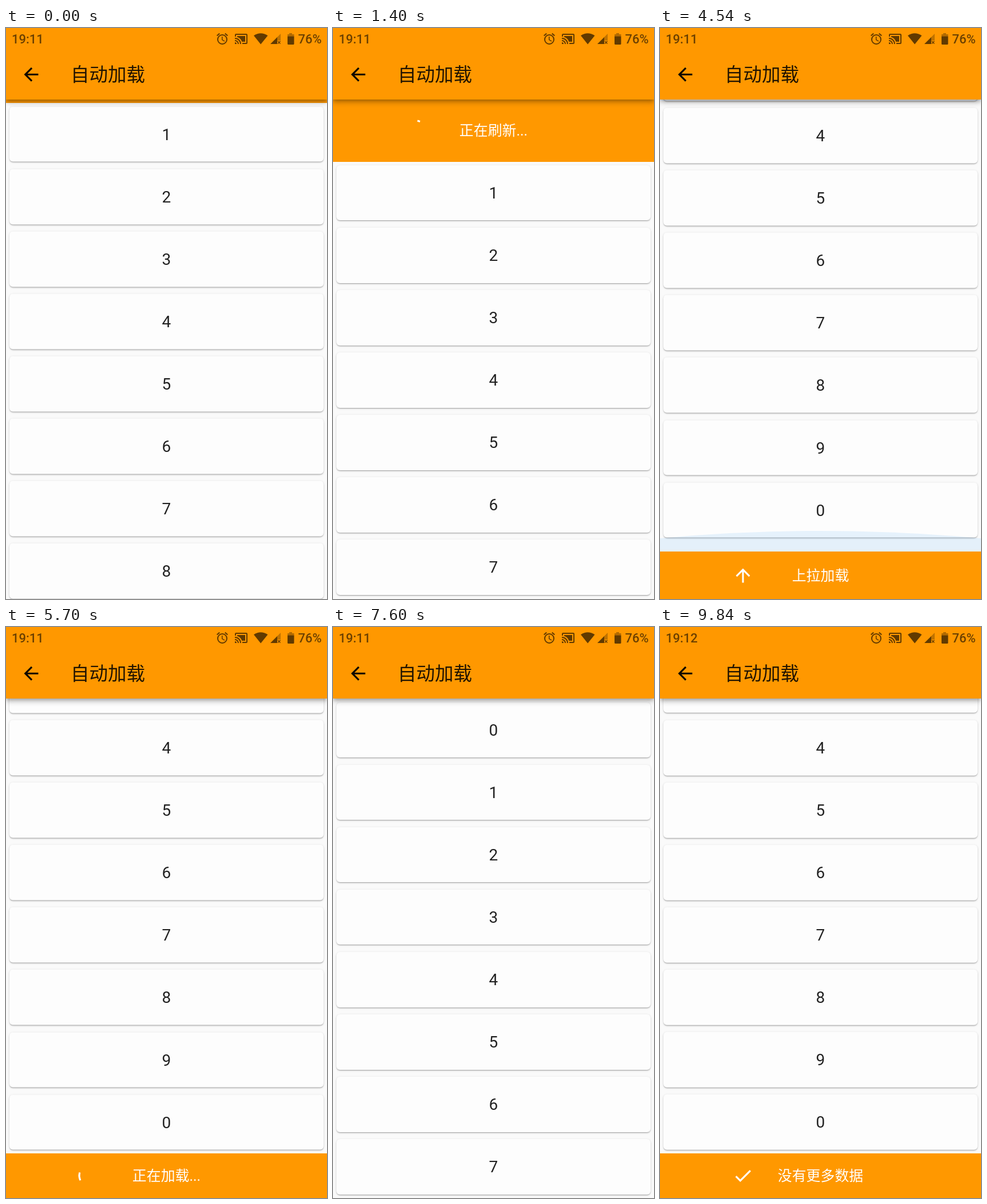
An HTML page that plays this animation: 561 by 998 pixels, repeating every 9.99 s.

```html
<!DOCTYPE html>
<html lang="zh-CN">
<head>
<meta charset="utf-8">
<title>自动加载</title>
<style>
  html, body { margin: 0; width: 100%; height: 100%; overflow: hidden; }
  body {
    position: relative; background: #fafafa; color: rgba(0, 0, 0, .87);
    font-family: Roboto, "Noto Sans CJK SC", "Noto Sans CJK", "Noto Sans", sans-serif;
  }
  #stage { position: absolute; left: 0; top: 0; width: 561px; height: 998px; overflow: hidden; }
  #list { position: absolute; left: 0; top: 124.7px; width: 561px; overflow: hidden; }
  .card {
    position: absolute; left: 6.2px; width: 548.6px; height: 96.6px; border-radius: 6px;
    background: #fdfdfd; text-align: center; font-size: 28px; line-height: 97px;
    box-shadow: 0 2px 2px -1px rgba(0, 0, 0, .2), 0 1px 2px rgba(0, 0, 0, .15), 0 1px 4px rgba(0, 0, 0, .1);
  }
  .over { position: absolute; left: 0; top: 0; width: 561px; height: 998px; }
  .bar { position: absolute; left: 0; width: 561px; overflow: hidden; background: #ff9800; color: #fff; }
  #header { top: 124.7px; }
  #footer { bottom: 0; }
  .inner { position: absolute; left: 0; width: 100%; }
  #header .inner { bottom: 0; }
  #footer .inner { top: 0; }
  .label {
    position: absolute; left: 0; right: 0; top: 50%; margin-top: -19px;
    text-align: center; font-size: 24.9px; line-height: 40px; white-space: pre;
  }
  .icon { position: absolute; left: 125px; top: 50%; width: 40px; height: 40px; margin-top: -20px; }
  #appbar {
    position: absolute; left: 0; top: 0; width: 561px; height: 124.7px; background: #ff9800;
    box-shadow: 0 3px 6px -1px rgba(0, 0, 0, .22), 0 6px 8px rgba(0, 0, 0, .14), 0 1px 14px rgba(0, 0, 0, .12);
  }
  .status {
    position: absolute; top: 5px; font-size: 22px; line-height: 30px; font-weight: 500;
    color: rgba(0, 0, 0, .58); white-space: pre;
  }
  #title { position: absolute; left: 113px; top: 62px; font-size: 32.5px; line-height: 40px; white-space: pre; }
</style>
</head>
<body>
<div id="stage">
  <div id="list"></div>
  <svg class="over"><path id="glow" fill="#2196f3" fill-opacity=".1"/></svg>
  <div id="header" class="bar"></div>
  <div id="footer" class="bar"></div>
  <div id="appbar">
    <div id="clock" class="status" style="left:10px">19:11</div>
    <div class="status" style="left:510.5px">76%</div>
    <svg class="over" style="height:124px" fill-opacity=".62">
      <path transform="translate(366 7)" d="M22 5.72l-4.6-3.86-1.29 1.53 4.6 3.86zM7.88 3.39L6.6 1.86 2 5.71l1.29 1.53zM12.5 8H11v6l4.75 2.85.75-1.23-4-2.37zM12 4a9 9 0 1 0 0 18a9 9 0 1 0 0-18zm0 16a7 7 0 1 1 0-14a7 7 0 1 1 0 14z"/>
      <path transform="translate(399 7)" d="M1 18v3h3a3 3 0 0 0-3-3zm0-4v2a5 5 0 0 1 5 5h2a7 7 0 0 0-7-7zm18-7H5v1.63A13 13 0 0 1 13.37 17H19zM1 10v2a9 9 0 0 1 9 9h2a11 11 0 0 0-11-11zm20-7H3a2 2 0 0 0-2 2v3h2V5h18v14h-7v2h7a2 2 0 0 0 2-2V5a2 2 0 0 0-2-2z"/>
      <path d="M433 13.3Q445 5 457.5 13.3L445.2 28.5z"/>
      <path d="M480 10V22H474V16z" fill-opacity=".25"/>
      <path d="M474 16V28H462z"/>
      <path d="M475 23l4.5 4.5m0-4.5l-4.5 4.5" stroke="#000" stroke-opacity=".6" stroke-width="1.4"/>
      <path d="M492 14.5V11H495V9H500V11H503.500V14.500z" fill-opacity=".3"/>
      <path d="M492 14.500H503.500V27.500Q503.500 29 502 29H493.500Q492 29 492 27.500z"/>
      <path transform="translate(25.300 62.500) scale(1.558)" fill-opacity=".95" d="M20 11H7.830l5.590-5.590L12 4l-8 8 8 8 1.410-1.410L7.830 13H20z"/>
    </svg>
    <div id="title">自动加载</div>
  </div>
</div>
<script>
const LOOP = 9990, ROW = 109.08, VIEW = 873.3, HEAD = 109.08, FOOT = 77.9, TURN = 1018;
const $ = id => document.getElementById(id);
const clamp = (v, a, b) => Math.min(b, Math.max(a, v));
const smooth = u => u * u * (3 - 2 * u);

// Smooth interpolation through [time, value] pairs.
function track(points, t) {
  let i = points.findIndex(p => p[0] > t);
  if (i === 0) return points[0][1];
  if (i < 0) return points[points.length - 1][1];
  const [t0, a] = points[i - 1], [t1, b] = points[i];
  return a + (b - a) * smooth((t - t0) / (t1 - t0));
}

// Last [time, ...values] entry already reached.
const phase = (steps, t) => steps.filter(s => s[0] <= t).pop();

// cubic-bezier(.4, 0, .2, 1)
function fastOutSlowIn(x) {
  x = clamp(x, 0, 1);
  let lo = 0, hi = 1, s = .5;
  for (let i = 0; i < 18; i++) {
    s = (lo + hi) / 2;
    const bx = 1.2 * s * (1 - s) ** 2 + .6 * s * s * (1 - s) + s ** 3;
    if (bx < x) lo = s; else hi = s;
  }
  return s * s * (3 - 2 * s);
}

const PULL = [[0, 6.5], [20, 6.5], [110, 0], [320, 0], [900, 150], [1040, 150], [1290, HEAD], [3485, HEAD], [3720, 0]];
const SCROLL = [[3730, 0], [4480, 323], [4540, 318.5], [4640, 295.4], [7112, 295.4], [7960, 1412], [8050, 1407.8], [8150, 1386.2]];
const GLOW = [[4400, 70], [4540, 119], [4850, 60], [7950, 60], [8050, 92], [8150, 108], [8450, 60]];
const FLIP = [[705, 180], [800, 0]];
const HEAD_STEPS = [
  [0, 'check', '刷新结束'], [200, 'arrow', '下拉刷新'], [705, 'arrow', '释放刷新'],
  [1355, 'spin', '正在刷新...'], [2870, 'check', '刷新结束']
];
const FOOT_STEPS = [
  [0, 'arrow', '上拉加载'], [4580, 'spin', '正在加载...'],
  [7112, 'arrow', '上拉加载'], [8080, 'spin', '正在加载...'], [9510, 'check', '没有更多数据']
];

function makeBar(el, extent) {
  el.innerHTML = `<div class="inner"><svg class="icon" viewBox="-20 -20 40 40" overflow="visible">
    <g class="arrow"><path transform="scale(1.558) translate(-12 -12)" fill="#fff" d="M4 12l1.410 1.410L11 7.830V20h2V7.830l5.580 5.590L20 12l-8-8z"/></g>
    <path class="check" transform="scale(1.558) translate(-12 -12)" fill="#fff" d="M9 16.200L4.800 12l-1.400 1.400L9 19 21 7l-1.400-1.400z"/>
    <circle class="spin" r="17" pathLength="360" fill="none" stroke="#fff" stroke-width="3.100" stroke-linecap="square"/>
    </svg><div class="label"></div></div>`;
  const find = s => el.querySelector(s);
  const inner = find('.inner'), label = find('.label');
  const icons = { arrow: find('.arrow'), check: find('.check'), spin: find('.spin') };
  return (size, [start, icon, text], t, angle) => {
    el.style.height = size + 'px';
    inner.style.height = Math.max(extent, size) + 'px';
    if (label.textContent !== text) label.textContent = text;
    for (const k in icons) icons[k].style.display = k === icon ? '' : 'none';
    icons.arrow.setAttribute('transform', `rotate(${angle})`);
    if (icon === 'spin') spin(icons.spin, (t - start) / TURN);
  };
}

function spin(circle, turns) {
  const step = Math.floor(turns), u = turns - step;
  const head = 270 * fastOutSlowIn(u * 2), tail = 270 * fastOutSlowIn(u * 2 - 1);
  circle.setAttribute('transform', `rotate(${-90 + tail + u * 306 - step * 144})`);
  circle.setAttribute('stroke-dasharray', `${Math.max(head - tail, .06)} 720`);
}

const list = $('list'), clock = $('clock');
for (let i = 0; i < 20; i++) {
  const card = document.createElement('div');
  card.className = 'card';
  card.style.top = i * ROW + 6.2 + 'px';
  card.textContent = (i + 1) % 10;
  list.append(card);
}
const header = makeBar($('header'), HEAD), footer = makeBar($('footer'), FOOT);

function draw(t) {
  const pull = track(PULL, t), scroll = track(SCROLL, t);
  const count = t >= 7112 ? 20 : 10;
  const over = Math.max(0, scroll - (count * ROW - VIEW));
  const foot = over > FOOT ? FOOT + (over - FOOT) * .22 : over;

  list.style.height = count * ROW + 'px';
  list.style.transform = `translateY(${pull - scroll}px)`;
  header(pull, phase(HEAD_STEPS, t), t, track(FLIP, t));
  footer(foot, phase(FOOT_STEPS, t), t, 0);

  const top = 998 - track(GLOW, t);
  $('glow').setAttribute('d', over > 0 ? `M0 ${top + 13}Q280.5 ${top - 13} 561 ${top + 13}V998H0z` : 'M0 0');

  const time = t < 8800 ? '19:11' : '19:12';
  if (clock.textContent !== time) clock.textContent = time;
}

const born = performance.now();
function tick() {
  draw((performance.now() - born) % LOOP);
  requestAnimationFrame(tick);
}
tick();
</script>
</body>
</html>
```
